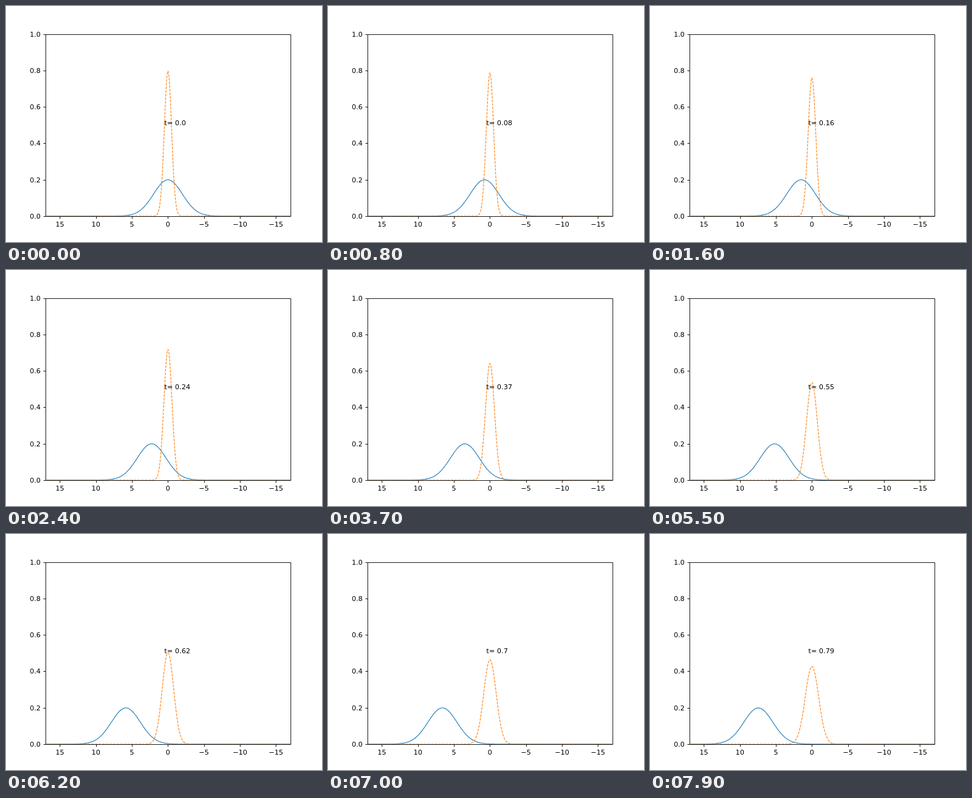
Recreate the animation shown at these times as an HTML page. Size 512x384 px, loop 8 s.

```html
<!DOCTYPE html>
<html lang="en">
<head>
<meta charset="utf-8">
<title>Spreading wave packets</title>
<style>
html, body { margin: 0; width: 100%; height: 100%; overflow: hidden; background: #fff; }
svg { display: block; }
text { font: 11.11px "DejaVu Sans", sans-serif; }
path { fill: none; stroke-width: 1.11; stroke-linejoin: round; }
#axes { stroke: #000; stroke-width: .889; stroke-linejoin: miter; }
</style>
</head>
<body>
<svg width="512" height="384" viewBox="0 0 512 384">
  <clipPath id="plot"><rect x="64" y="46.08" width="396.8" height="295.68"/></clipPath>
  <g clip-path="url(#plot)">
    <path id="moving" stroke="#1f77b4"/>
    <path id="resting" stroke="#ff7f0e" stroke-dasharray="4.11 1.78"/>
  </g>
  <path id="axes"/>
  <g id="labels"></g>
  <text id="clock" x="256.6" y="193.9"></text>
</svg>
<script>
const STEP = 100, STEPS = 80, SPEED = 3 * Math.PI;
const $ = id => document.getElementById(id);
const px = x => 262.4 - x * 396.8 / 34;
const py = y => 341.76 - y * 295.68;
const snap = v => Math.round(v) + 0.5;

function label(text, x, y, anchor) {
  const el = document.createElementNS('http://www.w3.org/2000/svg', 'text');
  el.setAttribute('x', x);
  el.setAttribute('y', y);
  el.setAttribute('text-anchor', anchor);
  el.textContent = text;
  $('labels').append(el);
}

function drawAxes() {
  let d = 'M64.5 46.5H461.5V342.5H64.5Z';
  for (let x = -15; x <= 15; x += 5) {
    d += `M${snap(px(x))} 342.5v3.89`;
    label(String(x).replace('-', '\u2212'), px(x), 359, 'middle');
  }
  for (let i = 0; i <= 5; i++) {
    const y = py(i / 5);
    d += `M64.5 ${snap(y)}h-3.89`;
    label((i / 5).toFixed(1), 56.2, Math.round(y) + 4, 'end');
  }
  $('axes').setAttribute('d', d);
}

// Gaussian packet whose width grows as it disperses
function packet(center, width, t) {
  const s = width * Math.hypot(1, t / (2 * width * width));
  const points = [];
  for (let i = -340; i <= 340; i++) {
    const x = i / 20;
    const y = Math.exp(-((x - center) ** 2) / (2 * s * s)) / (s * Math.sqrt(2 * Math.PI));
    points.push(px(x).toFixed(2) + ' ' + py(y).toFixed(2));
  }
  return 'M' + points.join('L');
}

let shown = -1;
function frame() {
  const n = Math.floor(performance.now() / STEP) % STEPS;
  if (n !== shown) {
    shown = n;
    const t = n / 100;
    $('moving').setAttribute('d', packet(SPEED * t, 2, t));
    $('resting').setAttribute('d', packet(0, 0.5, t));
    $('clock').textContent = 't= ' + (n ? t : '0.0');
  }
  requestAnimationFrame(frame);
}

drawAxes();
frame();
</script>
</body>
</html>
```
